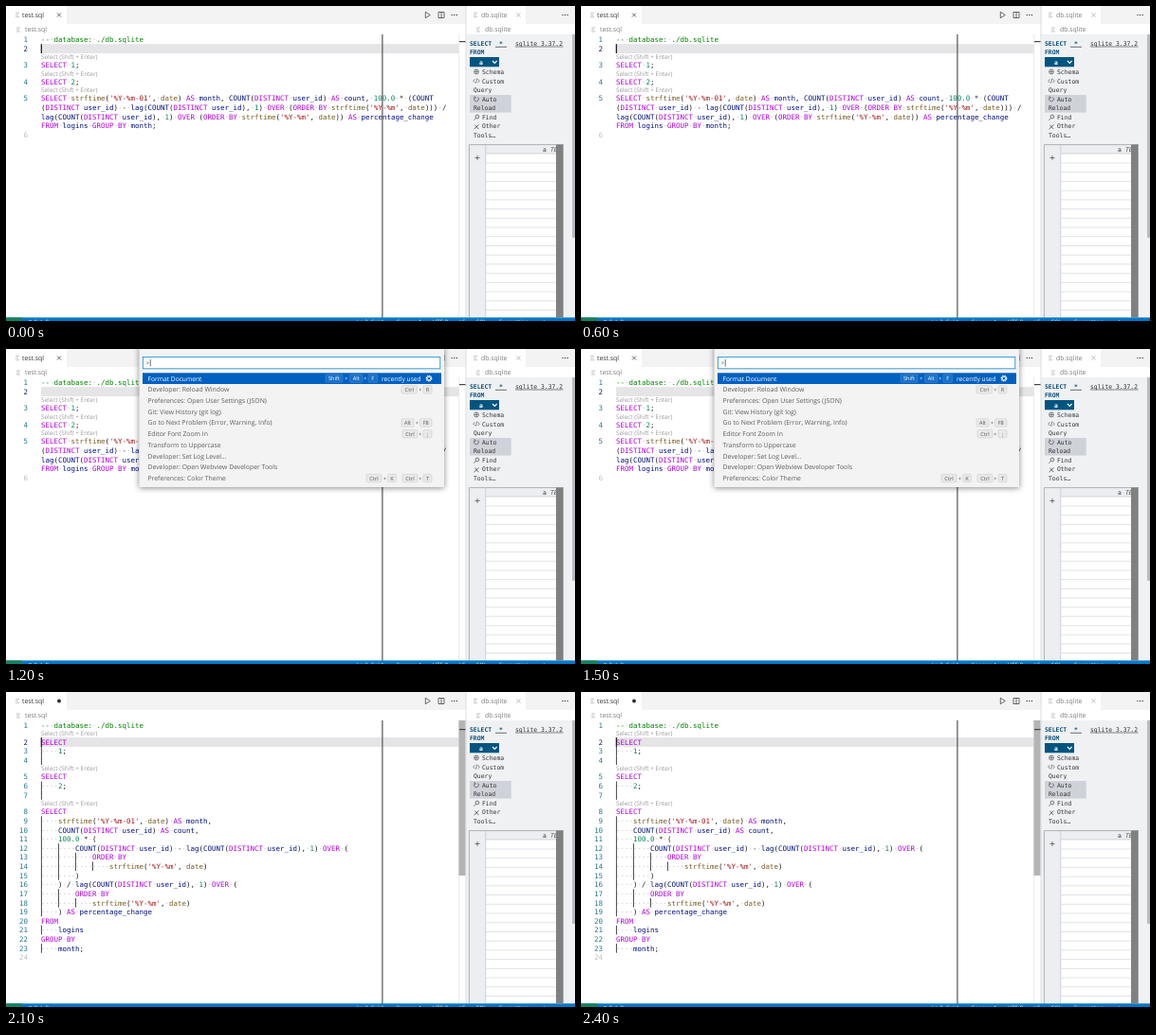
An HTML page for the animation above (2500 ms loop, 600 px wide and 333 px high).

```html
<!DOCTYPE html>
<html>
<head>
<meta charset="utf-8">
<style>
  html, body { margin: 0; width: 100%; height: 100%; overflow: hidden; background: #fff; }
  svg { display: block; width: 600px; height: 333px; }
  text { white-space: pre; text-rendering: geometricPrecision; }
  .ui { font-family: "Open Sans", "Noto Sans", sans-serif; }
  .mono { font-family: "DejaVu Sans Mono", monospace; }
</style>
</head>
<body>
<svg id="stage" viewBox="0 0 600 333"></svg>
<script>
const rect = (x, y, w, h, fill, more = '') =>
  `<rect x="${x}" y="${y}" width="${w}" height="${h}" fill="${fill}" ${more}/>`;
const path = (d, stroke, w = 0.8) =>
  `<path d="${d}" fill="none" stroke="${stroke}" stroke-width="${w}"/>`;
// y is the middle of the capital letters
const text = (x, y, s, fill, size, font, more = '') =>
  `<text x="${x}" y="${y + size * 0.36}" class="${font}" font-size="${size}" fill="${fill}" ${more}>${s}</text>`;
const ui = (x, y, s, fill, size = 6.85, more) => text(x, y, s, fill, size, 'ui', more);
const mono = (x, y, s, fill, size = 7.475, more) => text(x, y, s, fill, size, 'mono', more);
const cross = (x, y, c) => path(`M${x - 2} ${y - 2}l4 4m0-4l-4 4`, c, 0.8);
const dots = (x, y) => [0, 2.6, 5.2].map(d => `<circle cx="${x + d}" cy="${y}" r=".7" fill="#444"/>`).join('');
const fileIcon = (x, y) => path(`M${x} ${y - 2}h4m-4 2h3m-3 2h4`, '#aab', 0.7);
const group = (id, s) => `<g id="${id}">${s}</g>`;

// ---- code ----
const TOKEN = /(--.*)|('[^']*')|(\b\d+(?:\.\d+)?\b)|(\b(?:SELECT|AS|DISTINCT|OVER|ORDER|BY|FROM|GROUP)\b)|(\b(?:strftime|date)\b)|( +)|(\w+)/g;
const COLORS = ['#008000', '#a31515', '#098658', '#af00db', '#795e26', '#c4c4c8', '#001080'];
const span = (s, c) => `<tspan fill="${c}">${s}</tspan>`;
const paint = line => line.replace(TOKEN, (s, ...groups) => {
  const c = COLORS[groups.findIndex(g => g !== undefined)];
  return s.split(/( +)/).map(p => p && span(p.replace(/ /g, '·'), p[0] === ' ' ? COLORS[5] : c)).join('');
});

// "^" puts a run link above the line, "~" continues a wrapped line, "|" is an empty line with a guide
function code(lines) {
  let y = 25.8, n = 0, out = '';
  lines.forEach((raw, i) => {
    const mark = '^~|'.includes(raw[0]) ? raw[0] : '';
    const line = raw.slice(mark.length);
    y += 9.62;
    if (mark === '^') {
      y += 7.95;
      out += ui(37, y - 8.9, 'Select (Shift + Enter)', '#999', 6.4);
    }
    if (mark !== '~') {
      n++;
      const c = i === lines.length - 1 ? '#b8c0c8' : n === 2 ? '#0b216f' : '#237893';
      out += mono(23, y, n, c, 7.475, 'text-anchor="end"');
    }
    out += mono(37, y, paint(line), '#222');
    const depth = mark === '|' ? 1 : line.search(/\S|$/) / 4;
    for (let d = 0; d < depth; d++) out += rect(36.9 + d * 18, y - 4.9, 1, 9.7, '#444');
  });
  return out;
}

const packed = [
  '-- database: ./db.sqlite', '', '^SELECT 1;', '^SELECT 2;',
  "^SELECT strftime('%Y-%m-01', date) AS month, COUNT(DISTINCT user_id) AS count, 100.0 * (COUNT",
  "~(DISTINCT user_id) - lag(COUNT(DISTINCT user_id), 1) OVER (ORDER BY strftime('%Y-%m', date))) /",
  "~lag(COUNT(DISTINCT user_id), 1) OVER (ORDER BY strftime('%Y-%m', date)) AS percentage_change",
  '~FROM logins GROUP BY month;', ''
];
const formatted = [
  '-- database: ./db.sqlite', '^SELECT', '    1;', '|', '^SELECT', '    2;', '|', '^SELECT',
  "    strftime('%Y-%m-01', date) AS month,",
  '    COUNT(DISTINCT user_id) AS count,',
  '    100.0 * (',
  '        COUNT(DISTINCT user_id) - lag(COUNT(DISTINCT user_id), 1) OVER (',
  '            ORDER BY',
  "                strftime('%Y-%m', date)",
  '        )',
  '    ) / lag(COUNT(DISTINCT user_id), 1) OVER (',
  '        ORDER BY',
  "            strftime('%Y-%m', date)",
  '    ) AS percentage_change',
  'FROM', '    logins', 'GROUP BY', '    month;', ''
];
const activeLine = y => rect(37, y, 440.5, 9.8, '#e5e5e7');
const caret = y => rect(36.7, y, 1.2, 9.8, '#111');
const marker = y => rect(478, y, 7, 1.2, '#444');

// ---- window ----
function editorFrame() {
  return rect(64, 0, 421, 19, '#f3f3f3') + fileIcon(10, 9.5) + ui(17, 9.5, 'test.sql', '#333') +
    fileIcon(11, 25) + ui(20, 25, 'test.sql', '#777') +
    path('M442.3 6.3v6.4l5-3.2z', '#444') +
    path('M456 6.5h6v6h-6zM459 6.5v6', '#444') + dots(470.2, 9.5) +
    path('M477.7 30V329', '#e2e2e4', 0.8);
}

function sidePanel() {
  const navy = '#0b4f78', ink = '#333';
  const small = (x, y, s, c = ink, more) => mono(x, y, s, c, 6.4, more);
  let s = rect(485, 0, 115, 19, '#f3f3f3') + rect(485.5, 0, 62.5, 19, '#fff') +
    rect(485, 19, 115, 11, '#fff') + rect(485, 30, 115, 300, '#eff1f3') +
    fileIcon(493, 9.5) + ui(501, 9.5, 'db.sqlite', '#777') + cross(540.5, 9.5, '#aaa') + dots(587, 9.5) +
    fileIcon(496, 25) + ui(505, 25, 'db.sqlite', '#777') +
    path('M485 0V329', '#dcdcde', 0.9) +
    rect(597, 30, 3, 215, '#bcbcc0');
  s += small(489, 39.5, 'SELECT', navy, 'font-weight="bold"') + small(520, 40, '*', navy, 'font-weight="bold"') +
    path('M516 43.3h12', ink, 0.7) + small(537, 39.5, 'sqlite 3.37.2') + path('M537 43h50.5', ink, 0.6) +
    small(489, 48.7, 'FROM', navy, 'font-weight="bold"') +
    rect(489, 54, 31, 10.3, '#00557f') + small(499, 59.2, 'a', '#fff', 'font-weight="bold"') +
    path('M513 58l2.3 2.4l2.3-2.4', '#fff', 1.1) +
    rect(489, 94, 43.7, 18.6, '#cfd2d8');
  const menu = [[502, 'Schema'], [502, 'Custom'], [493, 'Query'], [502, 'Auto'], [493, 'Reload'],
    [502, 'Find'], [502, 'Other'], [493, 'Tools…']];
  menu.forEach(([x, label], i) => s += small(x, 69.7 + i * 9.6 - (i > 3 ? 0.4 : 0), label));
  s += path('M493.5 69.5a2.5 2.5 0 1 0 5 0a2.5 2.5 0 1 0-5 0M494 69.5h4M496 67v5', '#444', 0.6) +
    path('M494.5 77.2l-1.8 2l1.8 2m3-4l1.8 2l-1.8 2m-.8-4.6l-1.2 5', '#444', 0.6) +
    path('M494 97a2.4 2.4 0 1 0 3.5-.5M493.3 96h1.6v2', '#444', 0.7) +
    path('M495 117a1.9 1.9 0 1 0 3.8 0a1.9 1.9 0 1 0-3.8 0M495.6 118.4l-2.3 2.3', '#444', 0.7) +
    path('M498.5 125.5l-5 4.6m1-4.4l3.8 4.4', '#444', 0.8);
  // table
  s += rect(488, 146.5, 100, 183, '#eceef1') + rect(506, 156, 74, 173.5, '#fff') +
    path('M488.4 329V146.6H588', '#a0a2a8', 0.8) + path('M505.8 147V329M506 156H580', '#c2c4ca', 0.7);
  for (let y = 166; y < 329; y += 9.72) s += path(`M506 ${y}h74`, '#d5d7e0', 0.7);
  s += small(566, 151.5, 'a') + small(574, 151.5, 'TE', '#555', 'font-style="italic"') +
    rect(580, 146.5, 7.7, 182.5, '#808080') + path('M494.5 160.5h5m-2.5-2.5v5', '#444', 0.7);
  return s;
}

function statusBar() {
  const label = (x, s) => ui(x, 334, s, '#fff', 6);
  return rect(0, 329.3, 600, 4, '#0078c8') + rect(0, 329.3, 17, 4, '#16825d') +
    label(23, '⊗ 0 ⚠ 0') + label(370, 'Ln 2, Col 1') + label(412, 'Spaces: 4') +
    label(450, 'UTF-8') + label(478, 'LF') + label(496, 'SQL') + label(520, 'Formatting') + label(564, '✓');
}

// ---- command palette ----
function palette() {
  const key = (x, w, y, s) =>
    rect(x, y - 4.2, w, 8.4, '#e9e9ea', 'rx="1.2" stroke="#cfcfd2" stroke-width=".6"') +
    ui(x + w / 2, y, s, '#555', 5.7, 'text-anchor="middle"');
  const plus = (x, y, c = '#555') => ui(x, y, '+', c, 5.7, 'text-anchor="middle"');
  const rowY = i => 31.1 + i * 11.72;
  const combo = (i, x, w, a, b, shift = 0) =>
    key(x, w, rowY(i), a) + plus(436.8 - shift, rowY(i)) + key(440 - shift, 9, rowY(i), b);
  const commands = ['Format Document', 'Developer: Reload Window', 'Preferences: Open User Settings (JSON)',
    'Git: View History (git log)', 'Go to Next Problem (Error, Warning, Info)', 'Editor Font Zoom In',
    'Transform to Uppercase', 'Developer: Set Log Level...', 'Developer: Open Webview Developer Tools',
    'Preferences: Color Theme'];
  let s = rect(140.5, -4, 321.5, 150, '#f3f3f3', 'style="filter:drop-shadow(0 1px 3px #0007)"') +
    rect(144.4, 8.4, 313.4, 12.4, '#fff', 'stroke="#2a93d8" stroke-width=".9"') +
    ui(147.5, 14.8, '&gt;', '#555', 6.6) + rect(151.8, 11, 0.7, 7.5, '#333') +
    rect(144, 25.3, 315, 11.7, '#0060c0');
  commands.forEach((c, i) =>
    s += ui(149.5, rowY(i), c, i ? '#5c5c5c' : '#fff', i ? 6.85 : 6.7, i ? '' : 'font-weight="500"'));
  const y = rowY(0);
  s += [[337, 18, 'Shift'], [362.5, 13.5, 'Alt'], [382, 9.5, 'F']].map(([x, w, k]) =>
    rect(x, y - 4.2, w, 8.4, '#1a70c8', 'rx="1.2" stroke="#4c90d4" stroke-width=".5"') +
    ui(x + w / 2, y, k, '#fff', 5.7, 'text-anchor="middle"')).join('');
  s += plus(359, y, '#fff') + plus(379, y, '#fff') + ui(396, y, 'recently used', '#fff', 6.7, 'font-weight="500"') +
    `<circle cx="446" cy="${y}" r="2.7" fill="none" stroke="#fff" stroke-width="1.4" stroke-dasharray="1.4 .7"/>` +
    `<circle cx="446" cy="${y}" r="1.7" fill="none" stroke="#fff" stroke-width=".8"/>`;
  s += combo(1, 417, 16.5, 'Ctrl', 'R') +
    key(417, 13, rowY(4), 'Alt') + plus(433.3, rowY(4)) + key(436.5, 12.5, rowY(4), 'F8') +
    combo(5, 418, 16, 'Ctrl', ';') + combo(9, 380, 16, 'Ctrl', 'K', 37.5) + combo(9, 418, 16, 'Ctrl', 'T');
  return s;
}

const stage = document.getElementById('stage');
stage.innerHTML = rect(0, 0, 600, 333, '#fff') + editorFrame() +
  group('before', activeLine(40.2) + code(packed) + marker(37) + cross(56, 9.5, '#444')) +
  group('caret', caret(40.2)) +
  group('after', activeLine(48.1) + rect(477.5, 30, 7.2, 164, '#e4e4e6', 'id="thumb"') + code(formatted) +
    caret(48.1) + marker(39) + '<circle cx="56" cy="9.5" r="2" fill="#333"/>') +
  rect(396.3, 30, 1.2, 300, '#555') + sidePanel() + statusBar() + group('palette', palette());

const el = id => document.getElementById(id);
const show = (id, on) => el(id).setAttribute('visibility', on ? 'visible' : 'hidden');
function frame() {
  const t = performance.now() % 2500;
  show('before', t < 1600);
  show('caret', t < 700);
  show('palette', t >= 700 && t < 1600);
  show('after', t >= 1600);
  el('thumb').setAttribute('fill', t < 2100 ? '#e4e4e6' : '#b4b4b7');
  requestAnimationFrame(frame);
}
frame();
</script>
</body>
</html>
```
